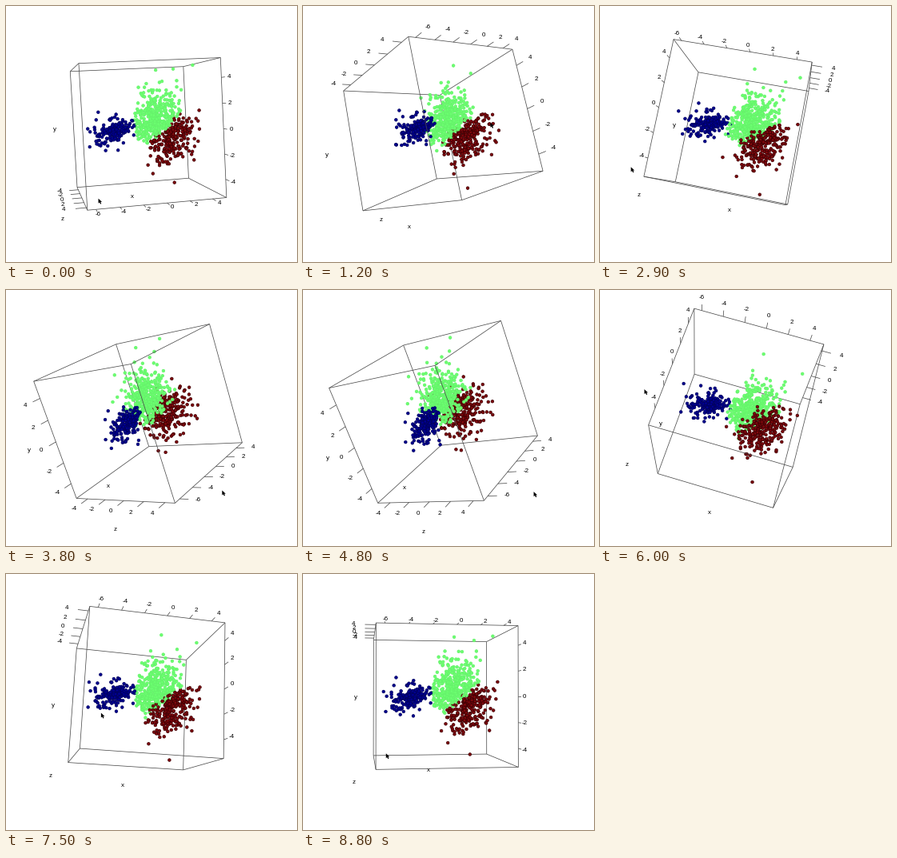
Write a matplotlib script that moves like this. It is 364 px wide and 320 px high and loops after 9 s.

```python
import itertools

import numpy as np
import matplotlib.pyplot as plt
from matplotlib.animation import FuncAnimation
from matplotlib.collections import LineCollection
from matplotlib.patches import Polygon

W, H, DPI = 364, 320, 100
PT = 72 / DPI                      # points per pixel
FRAMES, STEP = 90, 100
FOCAL, DIST = 676, 8.5
CENTRE = np.array([169.6, 153.8])
INK = "#4a4a4a"

CUBE = np.array(list(itertools.product((-1, 1), repeat=3)), float)
EDGES = [(i, j) for i, j in itertools.combinations(range(8), 2)
         if np.abs(CUBE[i] - CUBE[j]).sum() == 2]

# Yaw, pitch and roll of the main views, in degrees
START = 10.6, 3.5, 3
LEFT = 38.9, -14.5, 11.6
BELOW = -3.7, -25.3, -17.6
TILT = -7.7, -6.3, -11.3
SIDE = 51.8, 15.7, 20.3
LOW = 11.4, -12.8, -2.6
FRONT = 7.8, -.7, 0

KEYS = [(0, START), (600, (31, -8, 9)), (1200, LEFT), (2100, BELOW), (2350, BELOW),
        (2900, TILT), (3700, (46, 13, 17)), (4250, (54, 17, 21)), (4800, SIDE),
        (5000, (48, 13, 18)), (5900, BELOW), (6400, BELOW), (7500, LOW),
        (8000, (9, -5, -1)), (8700, FRONT)]
TIMES = [t for t, _ in KEYS]
ANGLES = np.array([a for _, a in KEYS])

# axis: tick values, range centre, half range
SCALES = [(range(-6, 5, 2), -.73, 5.98), (range(-4, 5, 2), .04, 5.49),
          (range(-4, 5, 2), -.22, 5.12)]
TICK, LABEL, TITLE = .15, .31, 1.31


def rotation(angles):
    (cy, cp, cr), (sy, sp, sr) = np.cos(angles), np.sin(angles)
    yaw = np.array([(cy, 0, sy), (0, 1, 0), (-sy, 0, cy)])
    pitch = np.array([(1, 0, 0), (0, cp, -sp), (0, sp, cp)])
    roll = np.array([(cr, -sr, 0), (sr, cr, 0), (0, 0, 1)])
    return roll @ pitch @ yaw


def pointer_at(yaw, pitch):
    """The pointer drags the box, so its place follows from the angles."""
    return np.array([73 + 4.2 * yaw, 231 + 4.1 * pitch - .015 * yaw ** 2])


def project(points, rot):
    cam = np.atleast_2d(points) @ rot.T
    k = FOCAL / (DIST - cam[:, 2:])
    return CENTRE + cam[:, :2] * k * (1, -1), cam[:, 2]


def make_cloud():
    """Three clusters, cut apart by flat borders."""
    rng = np.random.default_rng(12)

    def blob(n, mean, sd, lean):
        p = rng.normal(mean, sd, (n, 3))
        p[:, 1] += lean * (p[:, 0] - mean[0])
        return p[np.abs(p).max(axis=1) < .96]

    def height(p):
        """Signed height above the green and red border."""
        return p[:, 1] + .33 - .82 * p[:, 0] - .2 * p[:, 2] + rng.normal(0, .04, len(p))

    blue = np.vstack([blob(145, (-.43, 0, .04), (.13, .06, .08), .22),
                      blob(55, (-.45, -.02, .04), (.23, .15, .14), .1)])
    blue = blue[blue[:, 0] < -.1]

    green = blob(440, (.22, -.02, 0), (.18, .13, .17), .35)
    green[:, 1] += rng.exponential(.17, len(green))
    green = green[(height(green) > 0) & (green[:, 0] > -.12) & (green[:, 1] < .8)]
    green = np.vstack([green, [(.17, .89, .47), (.85, .96, .1), (.62, .93, -.25)]])

    red = blob(330, (.44, -.15, .08), (.18, .19, .22), .2)
    red = np.vstack([red[height(red) < 0], [(.55, -.93, -.25)]])

    parts = [blue, green, red]
    return np.vstack(parts), np.repeat(range(3), [len(p) for p in parts])


CLOUD, GROUP = make_cloud()
FACES = np.array([(0, 0, .57), (.42, 1, .44), (.5, .03, .05)])[GROUP]
RIMS = np.array([(0, 0, .36), (.4, .95, .42), (.24, 0, .01)])[GROUP]


def axis_ticks(rot):
    """Edge position and outward direction of the ticks for x, y and z."""
    sx, sy, sz = np.where(rot[2] > 0, 1, -1)
    out_x, out_z = np.array([sx, 0, 0]), np.array([0, 0, sz])
    if abs(rot[2, 0]) > abs(rot[2, 2]):
        y_axis = (sx, 0, -sz), out_x
    else:
        y_axis = (-sx, 0, sz), out_z
    return [((0, -sy, sz), out_z), y_axis, ((sx, -sy, 0), out_x)]


fig = plt.figure(figsize=(W / DPI, H / DPI), dpi=DPI, facecolor="white")
ax = fig.add_axes([0, 0, 1, 1])
ax.set(xlim=(0, W), ylim=(H, 0))
ax.axis("off")

back = ax.add_collection(LineCollection([], colors=INK, linewidths=.75 * PT, zorder=1))
front = ax.add_collection(LineCollection([], colors=INK, linewidths=.75 * PT, zorder=3))
dots = ax.scatter(CLOUD[:, 0], CLOUD[:, 1], s=(3.6 * PT) ** 2, linewidths=.7 * PT, zorder=2)


def label(s):
    return ax.text(0, 0, s, family="Liberation Sans", fontsize=8 * PT, color="black",
                   ha="center", va="center", zorder=1)


numbers = [[label(str(v)) for v in values] for values, _, _ in SCALES]
titles = [label(s) for s in "xyz"]

ARROW = np.array([(-2, -3), (-2, 3), (-.6, 1.8), (.6, 4), (1.7, 3.4), (.7, 1.3), (2.5, 1.2)])
pointer = ax.add_patch(Polygon(ARROW, closed=True, fc="black", ec="none", zorder=5))

# The picture rests for one extra step about every 13/3 steps
HOLDS = {round(2 + 13 * j / 3) for j in range(21)}


def draw(n):
    if n in HOLDS:
        n -= 1
    angles = np.array([np.interp(n * STEP, TIMES, a) for a in ANGLES.T])
    rot = rotation(np.radians(angles))

    corners, depth = project(CUBE, rot)
    near, far = [], []
    for i, j in EDGES:
        (near if depth[i] + depth[j] > .5 else far).append(corners[[i, j]])

    for axis, (base, out) in enumerate(axis_ticks(rot)):
        values, mid, half = SCALES[axis]
        for v, text in zip(values, numbers[axis]):
            p = np.array(base, float)
            p[axis] = (v - mid) / half
            pts, _ = project([p, p + TICK * out, p + LABEL * out], rot)
            far.append(pts[:2])
            text.set_position(pts[2])

    for axis, text in enumerate(titles):
        p = np.full(3, -TITLE)
        p[axis] = 0
        text.set_position(project(p, rot)[0][0])

    back.set_segments(far)
    front.set_segments(near)

    pts, depth = project(CLOUD, rot)
    order = np.argsort(depth)
    dots.set_offsets(pts[order])
    dots.set_facecolors(FACES[order])
    dots.set_edgecolors(RIMS[order])
    pointer.set_xy(ARROW + pointer_at(*angles[:2]))
    return [back, front, dots, pointer, *titles, *itertools.chain(*numbers)]


anim = FuncAnimation(fig, draw, frames=FRAMES, interval=STEP, repeat=True,
                     repeat_delay=0, blit=False)
plt.show()
```
